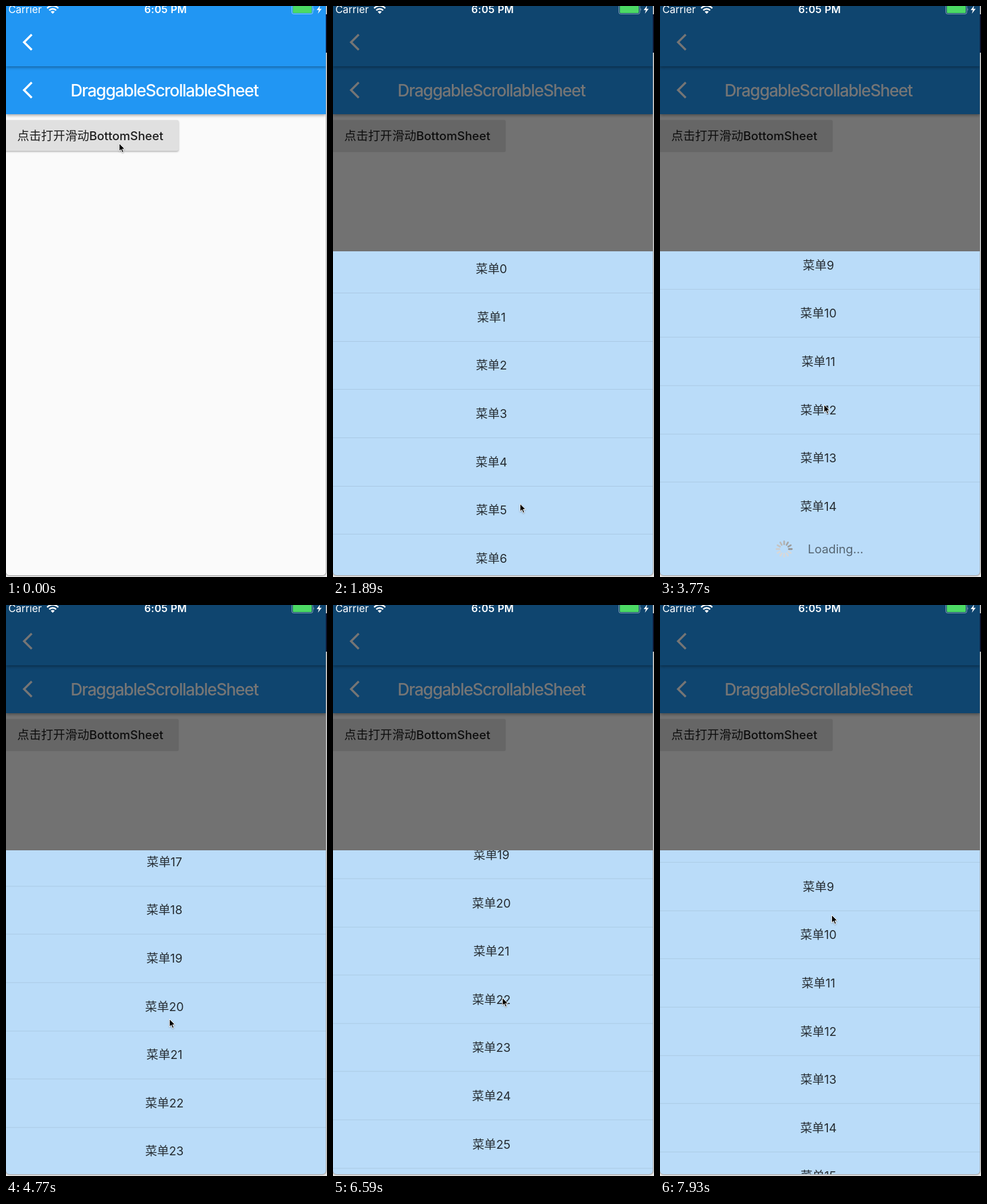
Recreate the animation shown at these times as an HTML page. Size 543x966 px, loop 7.99 s.

```html
<!DOCTYPE html>
<html lang="zh-CN">
<head>
<meta charset="utf-8">
<title>Bottom sheet</title>
<style>
html, body { margin: 0; width: 100%; height: 100%; overflow: hidden; background: #e9e9e9; }
body { position: relative; font-family: Inter, "Noto Sans CJK SC", "Noto Sans CJK", sans-serif; }
div, svg { position: absolute; }
div { white-space: nowrap; }
#strip { left: 541px; top: 14px; width: 2px; height: 65px; background: #0d1530; }
#screen {
  left: 0; top: 0; width: 541px; height: 963px; overflow: hidden;
  background: #fafafa; border-radius: 0 0 6px 6px;
}
#edge {
  left: 0; top: -20px; width: 541px; height: 983px; border-radius: 0 0 6px 6px;
  box-shadow: 0 0 2px 1px rgba(0, 0, 0, .38);
}
.bar { left: 0; width: 541px; background: #2196f3; box-shadow: 0 2px 5px rgba(0, 0, 0, .36); }
#bar1 { top: 0; height: 101.5px; }
#bar2 { top: 101px; height: 82px; }
.back { left: 27.8px; fill: #fff; }
#title {
  left: 0; width: 536px; top: 123px; line-height: 40px; text-align: center;
  font-size: 28px; font-weight: 500; letter-spacing: -1.27px; color: #fff;
}
#button {
  left: -10px; top: 192.5px; width: 301.5px; height: 52px; border-radius: 3px;
  background: #e0e0e0; box-shadow: 0 1.5px 3px rgba(0, 0, 0, .3);
}
#button.down { height: 54px; box-shadow: 0 0 2px rgba(0, 0, 0, .12); }
#button div {
  left: 29px; top: 0; line-height: 53px; font-size: 20.3px; font-weight: 500;
  color: rgba(0, 0, 0, .87);
}
#barrier { left: 0; top: 0; width: 541px; height: 963px; background: #000; }
#sheet { left: 0; top: 0; width: 541px; height: 548px; overflow: hidden; background: #badcf9; }
#list { left: 0; top: 0; width: 541px; }
.item {
  left: 0; width: 536px; height: 40px; line-height: 40px; text-align: center;
  font-size: 20.2px; color: rgba(0, 0, 0, .8);
}
.item::after {
  content: ""; position: absolute; left: 0; top: 60px; width: 541px; height: 1px;
  background: rgba(0, 0, 0, .09);
}
.item.last::after { display: none; }
#loader { left: 195px; width: 160px; height: 30px; }
#loader div { left: 55px; line-height: 30px; font-size: 20.2px; color: rgba(0, 0, 0, .54); }
#spin { left: 0; top: 0; }
.status { top: -4px; line-height: 20px; font-size: 17.3px; color: #fff; }
#icons { left: 0; top: 0; }
#cursor { left: 0; top: 0; overflow: visible; filter: drop-shadow(0 1px 1px rgba(0, 0, 0, .3)); }
</style>
</head>
<body>
<div id="edge"></div>
<div id="strip"></div>
<div id="screen">
  <div class="bar" id="bar2"></div>
  <div class="bar" id="bar1"></div>
  <svg class="back" style="top:44px" width="18" height="35" viewBox="0 0 12.47 24.25"><path id="arrow" d="M11.67 3.87 9.9 2.1 0 12 9.9 21.9 11.67 20.13 3.54 12Z"/></svg>
  <svg class="back" style="top:125.3px" width="18" height="35" viewBox="0 0 12.47 24.25"><use href="#arrow"/></svg>
  <div id="title">DraggableScrollableSheet</div>
  <div id="button"><div>点击打开滑动BottomSheet</div></div>
  <div id="barrier"></div>
  <div id="sheet">
    <div id="list">
      <div id="loader">
        <svg id="spin" width="30" height="30"></svg>
        <div>Loading...</div>
      </div>
    </div>
  </div>
  <div class="status" style="left:4px">Carrier</div>
  <div class="status" style="left:234px;font-weight:600;letter-spacing:.3px">6:05 PM</div>
  <svg id="icons" width="541" height="20">
    <g fill="none" stroke="#fff" stroke-width="2.6">
      <path d="M69.6 3.8A13 13 0 0 1 88.4 3.8"/>
      <path d="M73.2 7.4A8 8 0 0 1 84.8 7.4"/>
    </g>
    <path d="M79 13.2 75.6 9.8A4.8 4.8 0 0 1 82.4 9.8Z" fill="#fff"/>
    <rect x="483.5" y="-2" width="35.5" height="15.5" rx="3" fill="none" stroke="#fff" stroke-opacity=".5"/>
    <rect x="485.2" y="-.4" width="32" height="12.3" rx="1.5" fill="#4cd964"/>
    <path d="M520.3 3.5Q522.3 5.8 520.3 8.2Z" fill="#fff" fill-opacity=".5"/>
    <path d="M531.5 -1 525.5 7H529.2L527.6 13 534 4.8H530.2Z" fill="#fff"/>
  </svg>
</div>
<svg id="cursor" width="12" height="18">
  <path d="M.5 .5V13.6L3.6 10.8 5.8 16 8 15 5.9 10H10Z" fill="#000" stroke="#fff" stroke-width="1"/>
</svg>
<script>
const LOOP = 7990, ROW = 81.63, PAGE = 15;
const PRESS = 850, OPEN = 1030;
const LOADS = [4180, 6030];
const $ = id => document.getElementById(id);

// list offset at the end of a number of pages
const bottom = pages => pages * PAGE * ROW - 483.2;

// each move: start, end, then the pointer and list offset it leads to
const rest = [191, 232, 0];
const moves = [
  [0, 410, 178, 221, 0],
  [1280, 1960, 320, 860, 0],
  [1960, 2280, 313, 600, 250],
  [2280, 2610, 321, 788, 329.5],
  [2720, 3200, 300, 271, bottom(1)],
  [3200, 3740, 277, 674, bottom(1)],
  [4200, 4420, 282, 500, 1000],
  [4420, 4770, 276, 700, 1396],
  [4770, 5120, 282, 518, bottom(2)],
  [6230, 6560, 286, 664, 1573.5],
  [6600, 7650, 288, 512, 703.2],
  [7800, 7930, 290, 524, 703.2]
];

const clamp = (v, lo, hi) => Math.min(hi, Math.max(lo, v));
const mix = (a, b, u) => a + (b - a) * u;
const smooth = u => u * u * (3 - 2 * u);

function poseAt(t) {
  let [x, y, offset] = rest;
  for (const [start, end, toX, toY, toOffset] of moves) {
    const u = clamp((t - start) / (end - start), 0, 1);
    x = mix(x, toX, smooth(u));
    y = mix(y, toY, smooth(u));
    offset = mix(offset, toOffset, u);
  }
  return { x, y, offset };
}

const items = Array.from({ length: PAGE * 3 }, (_, i) => {
  const el = document.createElement("div");
  el.className = "item";
  el.textContent = "菜单" + i;
  el.style.top = 10 + ROW * i + "px";
  $("list").append(el);
  return el;
});

const ticks = Array.from({ length: 12 }, (_, i) => {
  const el = document.createElementNS("http://www.w3.org/2000/svg", "path");
  el.setAttribute("d", "M15 2V7");
  el.setAttribute("stroke-width", 2.8);
  el.setAttribute("stroke-linecap", "round");
  el.setAttribute("transform", `rotate(${i * 30} 15 15)`);
  $("spin").append(el);
  return el;
});

function draw(t) {
  const { x, y, offset } = poseAt(t);
  const count = PAGE * (1 + LOADS.filter(load => t >= load).length);

  // the sheet opens in three hard steps
  const step = clamp(Math.floor((t - OPEN) / 90), 0, 2);
  const top = t < OPEN ? 963 : 598 - 91.5 * step;

  $("button").className = t >= PRESS ? "down" : "";
  $("barrier").style.opacity = t < OPEN ? 0 : .504 + .018 * step;
  $("sheet").style.transform = `translateY(${top}px)`;
  $("list").style.transform = `translateY(${-offset}px)`;
  $("cursor").style.transform = `translate(${x}px, ${y}px)`;

  items.forEach((el, i) => {
    el.style.display = i < count ? "" : "none";
    el.classList.toggle("last", i === count - 1);
  });
  $("loader").style.top = 87.5 + ROW * (count - 1) + "px";

  const head = (Math.floor(t * 12 / 1000) + 6) % 12;
  ticks.forEach((el, i) => {
    const age = Math.min((head - i + 12) % 12, 7);
    const g = 146 + age * 10;
    el.setAttribute("stroke", `rgb(${g},${g},${g})`);
  });
}

const start = performance.now();
function tick() {
  draw((performance.now() - start) % LOOP);
  requestAnimationFrame(tick);
}
tick();
</script>
</body>
</html>
```
